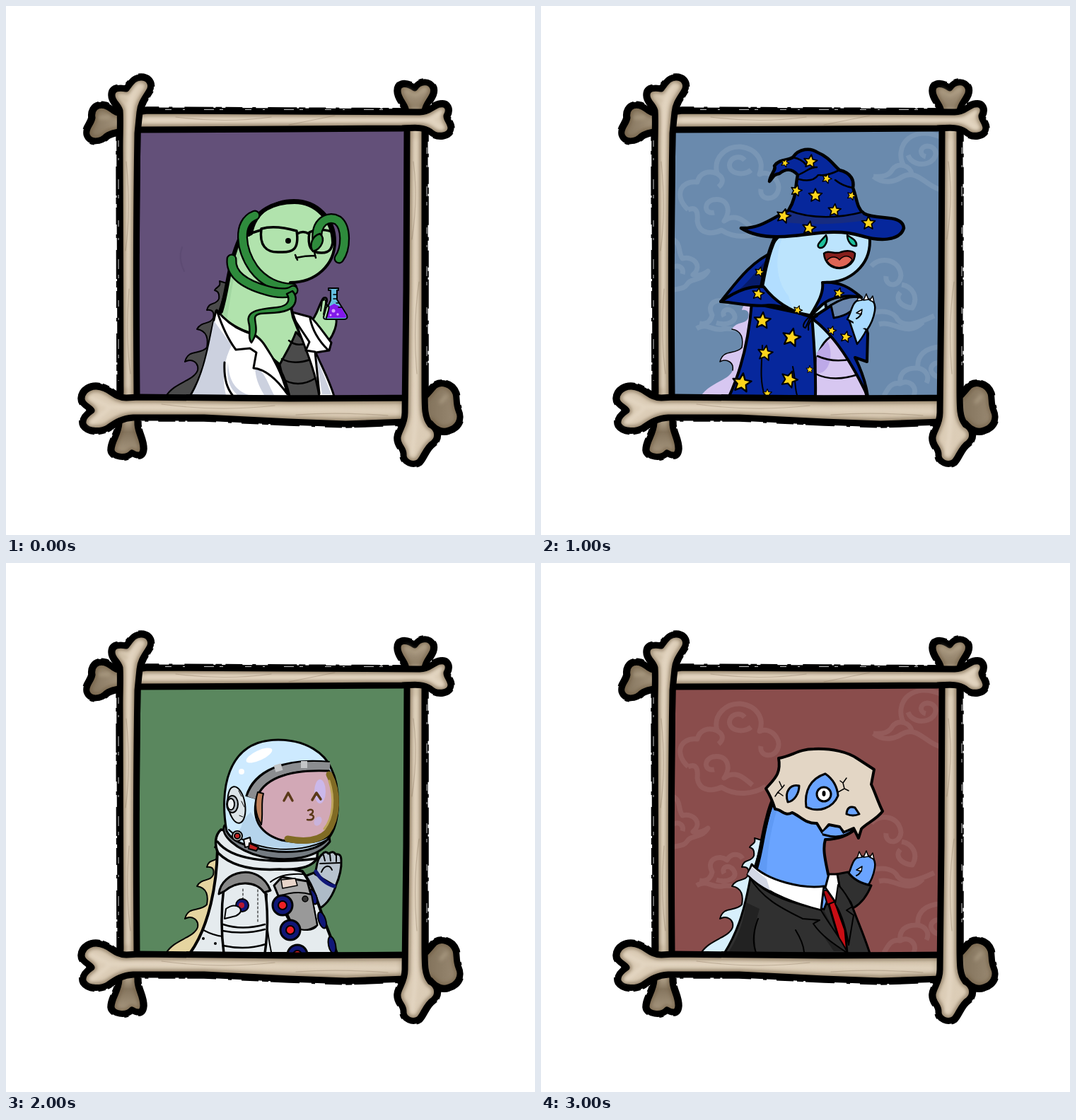
Animation of 748x748 px, one loop 4000 ms. Source, as an HTML page:

```html
<!DOCTYPE html>
<html lang="en">
<head>
<meta charset="utf-8">
<title>Bone frame portraits</title>
<style>
html, body { margin: 0; width: 100%; height: 100%; overflow: hidden; background: #fff }
svg { display: block; width: 100vw; height: 100vh }
.scene { visibility: hidden }
.scene.on { visibility: visible }
</style>
</head>
<body>
<svg viewBox="0 0 748 748" fill="none" stroke="#000" stroke-width="3" stroke-linejoin="round" stroke-linecap="round">
<defs>
  <clipPath id="inside"><path d="M185 175H567V554H185Z"/></clipPath>
  <clipPath id="upper"><path d="M100 80H300V350H100Z"/></clipPath>
  <clipPath id="headClip"><use href="#head"/></clipPath>
  <filter id="blur" filterUnits="userSpaceOnUse" x="80" y="80" width="590" height="590"><feGaussianBlur stdDeviation="2.5"/></filter>
  <linearGradient id="topFill" gradientUnits="userSpaceOnUse" x1="118" x2="632" y1="0" y2="0">
    <stop stop-color="#84745d"/><stop offset=".08" stop-color="#a3937b"/><stop offset=".13" stop-color="#dccdb7"/><stop offset="1" stop-color="#dccdb7"/>
  </linearGradient>
  <linearGradient id="rightFill" gradientUnits="userSpaceOnUse" x1="0" x2="0" y1="108" y2="645">
    <stop stop-color="#b3a28a"/><stop offset=".06" stop-color="#93836b"/><stop offset=".12" stop-color="#d6c7b0"/><stop offset="1" stop-color="#dccdb7"/>
  </linearGradient>
  <linearGradient id="bottomFill" gradientUnits="userSpaceOnUse" x1="108" x2="642" y1="0" y2="0">
    <stop stop-color="#dccdb7"/><stop offset=".83" stop-color="#d6c7b0"/><stop offset=".92" stop-color="#85755e"/><stop offset="1" stop-color="#9b8b74"/>
  </linearGradient>
  <linearGradient id="leftFill" gradientUnits="userSpaceOnUse" x1="0" x2="0" y1="103" y2="640">
    <stop stop-color="#dccdb7"/><stop offset=".88" stop-color="#d3c4ac"/><stop offset=".93" stop-color="#85755e"/><stop offset="1" stop-color="#b0a088"/>
  </linearGradient>

  <path id="left" d="M162 545L161 200C161 180 162 160 161 148C158 138 150 136 150 126C150 116 160 115 170 117C176 110 180 101 191 101C203 101 208 112 202 121C196 131 190 138 189 150L186 180C184 300 184 420 185 548L186 592C187 605 194 612 194 626C193 638 185 636 178 632C170 641 150 638 149 628C149 615 159 606 160 590Z"/>
  <path id="bottom" d="M170 554C156 554 150 545 140 541C125 534 108 540 107 555C107 565 119 567 121 572C112 578 106 585 110 593C117 603 135 602 145 596C156 588 165 583 180 582L280 582L400 588L480 591L565 588L600 590C608 600 618 603 626 600C638 597 646 585 640 572C636 562 638 555 636 548C631 534 615 530 606 537C600 543 598 548 590 554L400 555L188 553Z"/>
  <path id="right" d="M567 175L566 150C566 140 554 132 554 120C554 107 568 109 578 116C585 105 600 105 604 116C607 128 594 135 592 148L592 300L592 540C592 570 592 582 600 592C612 598 612 612 604 618C594 624 590 640 584 645C575 651 562 645 562 635C563 625 553 622 554 610C555 600 564 592 564 575L566 400Z"/>
  <path id="top" d="M170 152C150 153 150 143 140 141C128 138 120 146 122 158C120 168 112 172 114 182C118 195 135 192 142 184C150 178 155 180 165 176L190 175L400 174L560 173C580 172 590 171 600 178C610 187 628 184 629 173C629 165 622 160 623 155C628 146 624 137 614 139C604 140 600 150 585 150L400 149L200 148Z"/>

  <path id="head" d="M299 440C309 414 314 390 320 362C324 345 333 326 347 322C352 292 378 275 407 275C440 275 465 300 465 333C465 366 438 391 402 391C398 405 402 420 406 440L418 470L388 508L340 468Z"/>
  <path id="neckLine" d="M304 432C312 405 313 385 320 360C323 347 327 337 331 328" stroke-width="6"/>
  <path id="spikes" d="M226 552C238 532 266 530 271 515C273 504 263 498 253 503C258 484 274 494 284 483C286 472 285 459 270 457C277 445 289 451 293 441C295 433 292 429 284 430C287 417 297 424 301 414C302 407 300 403 295 402C298 396 304 398 302 389L312 392L304 470L278 552Z"/>
  <path id="star" d="M0-10L2.8-3.6L9.5-3.1L4.5 1.4L5.9 8.1L0 4.8L-5.9 8.1L-4.5 1.4L-9.5-3.1L-2.8-3.6Z"/>
  <g id="clouds" stroke="#fff" stroke-opacity=".1" stroke-width="7" stroke-linecap="butt">
    <path d="M208 288C188 270 196 246 221 249C224 236 236 232 249 237C243 214 262 198 282 199C306 202 316 220 309 238C324 231 340 248 335 262C330 277 308 274 311 259M249 237C259 243 258 250 251 256M297 232C285 242 263 236 267 222C270 213 282 211 288 218M208 288C221 283 222 293 221 304C224 325 245 322 255 317C275 330 300 327 318 316M245 292C231 295 229 278 243 274C263 270 270 288 259 304C276 291 289 306 299 314"/>
    <path d="M567 186C545 176 529 180 520 187C506 198 507 216 513 226M470 241C484 242 492 240 497 231C506 220 522 226 524 237M470 241C485 253 501 248 510 242C532 229 545 256 566 260M544 213C535 211 535 199 546 198C563 199 561 217 547 222C536 226 523 222 519 211"/>
    <path d="M186 330C199 336 193 348 200 357C216 353 229 368 215 380C223 382 229 380 236 375C227 390 212 384 207 393C202 401 194 399 186 402M187 369C197 365 202 372 200 379"/>
    <path d="M220 456C236 447 241 460 256 457C268 454 275 461 288 452M224 449C234 451 240 446 242 437C233 420 250 411 263 420C269 409 281 411 285 418M259 439C254 430 266 425 272 434C280 445 264 453 248 448"/>
    <path d="M467 368C480 353 507 358 509 381C507 399 486 397 488 382M510 394C526 397 534 412 525 427C508 425 500 414 508 405M468 434C486 429 500 434 504 443C514 456 535 448 556 438M478 450C500 444 517 470 540 447"/>
    <path d="M567 482C543 482 531 495 533 512C516 511 506 519 508 534C496 531 491 540 485 551M567 505C553 502 547 514 555 521C562 527 567 523 567 520M533 512C544 514 550 523 545 533M508 534C520 527 533 538 527 551"/>
  </g>
  <g id="hand">
    <path d="M433 443C439 433 440 418 449 416C453 414 455 415 457 415C461 413 464 414 466 416C472 417 473 425 472 431C470 443 466 451 461 458Z" stroke-width="2.5"/>
    <path d="M446 442Q451 440 453 434" stroke-width="2"/>
    <path fill="#fff" stroke-width="1.5" d="M447 417L450 408L454 416ZM456 416L460 407L463 415ZM465 416L469 410L471 419ZM446 434L454 429L453 436Z"/>
  </g>
</defs>

<!-- rough brush rim -->
<g stroke-width="11.500" stroke-dasharray="24 5 9 3 41 17 5 14" stroke-linecap="butt">
  <use href="#left"/><use href="#bottom"/><use href="#right"/><use href="#top"/>
</g>

<g clip-path="url(#inside)">
<g class="scene">
  <path fill="#635079" stroke="none" d="M185 175H567V554H185Z"/>
  <path d="M249 341Q243 357 252 375" stroke="#5d4b73" stroke-width="2"/>
  <use href="#spikes" fill="#4b4b4b" stroke-width="2"/>
  <path fill="#b1e3ad" d="M430 447C440 440 443 419 449 413C454 411 455 416 452 421L466 438C470 449 463 465 456 474Z"/>
  <use href="#head" fill="#b1e3ad" stroke-width="4"/>
  <path clip-path="url(#headClip)" fill="#a2d7a1" stroke="none" d="M298 440C312 410 316 360 335 323L340 330C323 365 319 405 312 445Z"/>
  <use href="#neckLine"/>
  <path d="M343 323C350 287 382 277 408 277C439 277 462 303 463 333" stroke-width="6"/>
  <path fill="#4b4b4b" d="M387 507C396 490 404 478 410 461L430 482L446 552H397Z"/>
  <path d="M390 499Q407 508 430 500M388 526Q413 542 438 526M400 473Q410 482 424 477" stroke-width="2.5"/>
  <path fill="#fff" d="M297 431C285 480 283 515 260 552H401C396 530 390 514 375 495C365 476 354 463 342 461C323 454 311 445 297 431Z"/>
  <path fill="#ccd1df" stroke="none" d="M294 445C286 485 281 516 263 550H311C306 530 306 505 319 480ZM314 504C315 530 324 543 343 550L327 550C315 539 311 524 314 504ZM352 511C365 515 370 533 379 550H365C356 535 353 525 352 511Z"/>
  <path fill="#fff" d="M298 430C305 452 313 470 325 486L345 484L354 490L350 512C370 514 386 532 398 549C392 526 381 502 368 483C356 462 343 464 335 459Q315 451 298 430Z"/>
  <path d="M309 504C308 523 312 540 320 550"/>
  <path fill="#fff" d="M405 433L431 440C441 449 451 465 460 476L457 487L438 490C445 507 457 528 464 552H443C438 520 426 490 415 462Z"/>
  <path fill="#ccd1df" stroke="none" d="M438 493L460 549H447Z"/>
  <path d="M409 445L429 475L424 487L437 489L443 548M430 442C433 457 442 473 455 486"/>
  <g stroke-width="2">
    <path fill="#64bfdf" d="M456 399H470V402H468V415L482 437Q484 443 478 443H453Q447 443 450 437L459 416V402H456Z"/>
    <path fill="#8219eb" stroke="none" d="M455 426L464 421L474 426L481 438Q482 441 478 441H453Q449 441 451 437Z"/>
    <path d="M463 408H468M463 414H468M467 420H471M470 426H475" stroke-width="1.5"/>
    <g fill="#d9a5ff" stroke="none"><circle cx="463" cy="431" r="2.5"/><circle cx="469" cy="436" r="1.7"/><circle cx="459" cy="437" r="1.5"/></g>
  </g>
  <path fill="#b1e3ad" d="M445 431L447 417Q453 412 452 421L449 436M449 440L453 426Q458 421 456 430L453 441" stroke-width="2"/>
  <g stroke-width="3.5"><path d="M344 322L360 317M361 315C377 310 397 314 411 318C415 345 405 349 387 348C367 349 358 338 361 315ZM412 322Q420 317 428 322M429 320C440 315 454 316 463 320C463 344 458 349 446 349C431 349 426 340 429 320Z"/></g>
  <circle cx="399" cy="332" r="4" fill="#000" stroke="none"/>
  <path d="M410 356Q423 353 437 353M409 352L412 359M436 348L438 356" stroke-width="2.5"/>
  <g id="snake"></g>
  <path fill="#2e8b3c" stroke-width="2.5" d="M405 403C413 411 411 425 398 430C379 438 353 430 352 441C352 451 358 460 347 476C341 469 347 459 343 447C339 429 365 428 384 426C400 424 402 415 397 407Z"/>
  <path fill="#2e8b3c" stroke-width="2.5" d="M434 347C428 338 433 325 444 322C452 329 447 343 434 347Z"/>
</g>

<g class="scene">
  <path fill="#6a8aad" stroke="none" d="M185 175H567V554H185Z"/>
  <use href="#clouds"/>
  <use href="#spikes" fill="#d7c7f1" stroke="none"/>
  <path d="M271 515C273 504 263 498 253 503C258 484 274 494 284 483C286 472 285 459 270 457" stroke-width="1.5"/>
  <path fill="#06279c" d="M254 418C272 397 293 363 330 347L319 402Z" stroke-width="4"/>
  <path fill="#061b6b" stroke="none" d="M279 402C296 388 311 366 323 354L316 397Z"/>
  <use href="#head" fill="#bce4fd" stroke-width="4"/>
  <path clip-path="url(#headClip)" fill="#b2deff" stroke="none" d="M295 450L335 318H345C330 350 330 386 350 410L385 520Z"/>
  <use href="#neckLine"/>
  <path fill="#d7c7f1" d="M389 503C394 480 403 471 412 466C440 480 452 510 460 552H386Z"/>
  <path fill="#bda9e8" stroke="none" d="M389 520C410 520 414 490 405 474L390 490Z"/>
  <path d="M391 495Q413 505 440 499M388 520Q414 533 451 520" stroke-width="2.5"/>
  <path fill="#06279c" stroke-width="4" d="M385 440L411 423C425 416 438 411 447 413L462 463L461 503L444 497C453 515 459 531 462 552C447 520 421 471 386 444Z"/>
  <path fill="#6a87ae" d="M410 423Q434 408 453 412C447 427 434 438 414 441Z"/>
  <g fill="#a9dbff"><path d="M435 442L464 448Q459 464 447 478Z" stroke-width="2.5"/><use href="#hand"/><path stroke="none" d="M441 440L461 440L460 455L443 458Z"/><path d="M446 442Q451 440 453 434" stroke-width="2"/></g>
  <path fill="#06279c" d="M298 420C294 470 284 513 266 552H388C389 512 386 474 383 438Z" stroke-width="4"/>
  <path fill="#06279c" d="M254 418C282 399 298 396 315 397C327 413 346 430 380 439C351 430 336 422 322 423C302 426 280 420 254 418ZM398 391C422 389 437 398 453 412C433 408 411 411 398 422L380 439C392 419 400 406 398 391Z" stroke-width="4"/>
  <path d="M313 480C312 507 309 529 316 550M356 510C360 528 359 542 362 550M379 440C370 448 369 455 374 455L381 440L397 452M382 439C390 430 397 440 384 441C375 455 379 452 378 458" stroke-width="2"/>
  <path fill="#06279c" stroke-width="4.500" d="M283 314C311 315 328 299 350 289C362 270 359 256 363 239C354 229 346 230 337 237C328 238 328 243 323 248C325 236 333 232 330 226C337 216 348 219 356 214C365 201 381 200 391 207C406 213 413 224 422 232C439 236 443 247 441 257C447 272 446 285 456 293C475 304 511 293 513 314C507 334 476 332 453 325C417 314 384 323 356 325C330 328 302 326 283 314Z"/>
  <path fill="#172c80" stroke="none" d="M352 291Q401 307 454 293L460 303Q400 312 345 306Z"/>
  <path d="M350 289C383 302 423 300 456 291M363 239C375 235 380 227 390 228M365 245Q384 250 392 239M356 214Q369 216 376 226M422 232Q403 241 394 239M441 257Q427 255 416 246" stroke-width="2.5"/>
  <g fill="#ffd51c" stroke-width="1.8" id="stars"></g>
  <g stroke-width="2.5">
    <path fill="#1dbf9b" d="M403 324C407 332 401 343 394 342C388 339 394 334 403 324ZM433 324C433 332 439 341 446 339C447 332 441 329 433 324Z"/>
    <path fill="#861f1c" d="M400 350C406 344 416 352 424 348C432 345 441 346 444 350C444 362 435 370 423 371C409 371 401 362 400 350Z"/>
    <path fill="#df6555" stroke-width="1.5" d="M404 360C410 353 418 354 422 359C429 351 437 353 440 359C431 373 413 373 404 360Z"/>
  </g>
</g>

<g class="scene">
  <path fill="#5a875e" stroke="none" d="M185 175H567V554H185Z"/>
  <use href="#spikes" fill="#e5d5a0" stroke-width="2"/>
  <path fill="#aebbc8" d="M415 446L438 437L466 458C460 474 452 485 440 490Z"/>
  <path fill="#b8c3ce" d="M437 440C440 427 440 417 447 412Q452 406 456 411Q463 406 466 412Q474 410 474 420C475 435 470 448 466 457Z"/>
  <path d="M449 413L451 421M458 412L459 421M467 413L467 422M444 425L472 424M446 437C450 427 458 426 461 434" stroke-width="2"/>
  <path d="M438 436Q447 452 464 457" stroke="#101777" stroke-width="5"/>
  <path fill="#e5ebee" d="M299 405C298 453 288 513 260 552H468L451 508C440 480 436 458 419 436Z" stroke-width="4"/>
  <path d="M279 519Q294 527 307 528M369 468C366 500 370 526 375 550M374 451Q390 438 421 440" stroke-width="2"/>
  <g fill="#000" stroke="none"><circle cx="279" cy="531" r="2"/><circle cx="296" cy="538" r="2"/></g>
  <g fill="#101777" stroke-width="2"><ellipse cx="434" cy="472" rx="5" ry="11" transform="rotate(-22 434 472)"/><ellipse cx="447" cy="505" rx="5" ry="12" transform="rotate(-18 447 505)"/><ellipse cx="461" cy="540" rx="5" ry="12" transform="rotate(-12 461 540)"/></g>
  <path fill="#aaa" d="M379 456L390 444L426 450L431 468L440 512Q432 524 407 514Q394 499 386 473Z"/>
  <path fill="#999" d="M386 471Q412 462 432 469L440 512Q420 526 405 511Z" stroke-width="2"/>
  <path fill="#e8d5ca" stroke-width="1.5" d="M389 448L409 446L412 456L391 460Z"/>
  <circle cx="423" cy="475" r="4" fill="#333" stroke-width="1.5"/>
  <g id="dials"></g>
  <path fill="#e5ebee" d="M308 459C304 490 304 521 308 552H366C371 517 371 487 365 456Q335 441 308 459Z" stroke-width="3.5"/>
  <path fill="#888" d="M301 468C304 435 358 422 374 463L365 466C353 449 326 449 309 464Z"/>
  <path d="M307 511Q334 520 366 511M306 520Q337 526 366 518M307 541Q339 548 367 539" stroke-width="2.5"/>
  <path d="M335 461V478M356 462V509" stroke-width="1" stroke-dasharray="3 3"/>
  <circle cx="334" cy="484" r="9" fill="#101777" stroke-width="2"/><circle cx="333" cy="484" r="4" fill="#b81930" stroke="none"/>
  <path fill="#e5ebee" d="M309 503L311 489Q322 481 330 487Q336 493 325 499Z" stroke-width="2"/>
  <path fill="#e5ebee" d="M304 377C296 384 294 398 300 410C321 431 354 435 387 433C410 434 433 431 440 417L441 402Z" stroke-width="3.5"/>
  <path d="M299 394C318 419 369 426 439 418" stroke-width="3.5"/>
  <path fill="#747b81" d="M309 371C302 384 325 406 361 415C400 424 440 417 458 394L457 387L320 377Z"/>
  <path fill="#cdeaff" d="M312 379C302 325 310 250 385 250C425 250 452 270 460 291C474 320 472 369 457 388C440 411 390 413 350 402C329 397 317 389 312 379Z"/>
  <path fill="#b5d4ec" stroke="none" d="M314 378C340 402 414 413 453 390L455 380C410 406 364 390 346 352L334 365Q334 384 314 378Z"/>
  <path d="M315 377C344 406 411 415 455 391" stroke-width="2"/>
  <path d="M346 332C355 300 393 282 457 288" stroke-width="16" stroke-linecap="butt"/>
  <path d="M347 332C358 301 394 282 458 288" stroke="#8b8d90" stroke-width="12" stroke-linecap="butt"/>
  <path d="M380 291L390 288M417 285L426 285" stroke="#c3c5c7" stroke-width="10" stroke-linecap="butt"/>
  <path fill="#d2a8b6" d="M354 334C362 307 396 291 457 294C472 320 474 365 456 386C440 398 410 396 390 392C362 384 347 365 354 334Z"/>
  <path d="M457 299C471 325 469 361 454 381C441 394 418 394 398 390" stroke="#806b24" stroke-width="9"/>
  <path d="M457 308C465 333 463 360 450 376" stroke="#bda55a" stroke-width="3"/>
  <path fill="#be805b" stroke-width="2" d="M356 324C351 340 352 355 361 370C364 353 360 340 364 326Z"/>
  <g stroke="none"><ellipse cx="444" cy="323" rx="8" ry="17" fill="#cbb8ea"/><ellipse cx="441" cy="365" rx="5" ry="7" fill="#c9b3dc" transform="rotate(30 441 365)"/><ellipse cx="358" cy="272" rx="20" ry="7" fill="#fff" transform="rotate(-25 358 272)"/><circle cx="333" cy="295" r="4" fill="#fff"/></g>
  <path d="M393 336L399 325L405 336M433 335L439 325L445 334" stroke="#5a3918" stroke-width="3.5"/>
  <path d="M427 350C434 346 437 353 430 356C438 356 436 365 426 363" stroke="#5a3918" stroke-width="2.5"/>
  <g stroke-width="2"><ellipse cx="326" cy="342" rx="12" ry="26" fill="#dce4e8" transform="rotate(-9 326 342)"/><ellipse cx="320" cy="341" rx="8" ry="12" fill="#b6bec4"/><ellipse cx="318" cy="341" rx="5" ry="8" fill="#eef2f4"/>
    <path d="M329 322L333 330M333 337L337 345M330 357L335 359" stroke-width="1"/>
    <circle cx="327" cy="386" r="7" fill="#eee"/><circle cx="327" cy="386" r="4" fill="#bd2222"/>
    <path fill="#eee" d="M336 391L345 388L347 400L338 402Z"/><path fill="#bd2222" d="M344 396L357 402L354 407L343 404Z"/></g>
</g>

<g class="scene">
  <path fill="#8a4d4c" stroke="none" d="M185 175H567V554H185Z"/>
  <use href="#clouds" opacity=".8"/>
  <use href="#spikes" fill="#d7effc" stroke-width="2"/>
  <g fill="#6aa4ff"><use href="#hand"/></g>
  <path fill="#303030" d="M408 442L434 437Q445 452 467 456Q458 478 443 487L424 490Z"/>
  <use href="#head" fill="#6aa4ff" stroke-width="4"/>
  <path clip-path="url(#headClip)" fill="#5f9af5" stroke="none" d="M300 442L335 320L340 330Q318 390 319 450Z"/>
  <use href="#neckLine"/>
  <path fill="#303030" d="M297 440C289 485 280 519 259 552H465C456 524 447 505 438 480L416 449L400 490Z"/>
  <path fill="#222" stroke="none" d="M290 480Q285 520 266 549H304Q300 515 309 489ZM400 491L430 549H414L386 508Z"/>
  <path fill="#c90d14" d="M401 466L411 463L415 477L430 519L433 552L424 541L407 483Z"/>
  <path fill="#b40a10" d="M399 463L411 463L415 479L405 483Z" stroke-width="2"/>
  <path fill="#fff" d="M298 426C320 450 371 461 400 457L396 491C365 483 323 470 292 441ZM407 440L419 440L425 474L418 482L402 459Z"/>
  <path fill="#d3d8e6" stroke="none" d="M298 430L292 440Q306 454 324 463L319 447Z"/>
  <path fill="#303030" d="M294 443C321 473 359 482 396 491C408 512 423 529 434 552C416 540 397 528 385 510L394 505L370 503C340 488 314 476 294 443ZM420 455C428 463 434 472 440 486L432 491L442 498L435 540Q429 502 416 482Z" stroke-width="2"/>
  <path d="M307 503C299 523 300 540 304 551M360 519Q371 537 372 550" stroke-width="2"/>
  <path fill="#e3d6c5" stroke-width="4" d="M336 276C355 273 364 263 386 263C411 262 434 267 448 277L471 292L467 313C473 326 477 339 483 351C474 363 460 368 453 376L449 389L442 375L428 381L422 373L407 370L398 381L390 368C374 369 366 357 355 353C344 359 340 348 331 348C327 335 323 327 318 319C329 306 340 299 336 276Z"/>
  <path fill="#6aa4ff" stroke="none" d="M398 381L407 373L422 375L427 383L442 377Q432 391 400 386Z"/>
  <path d="M399 384Q425 392 441 378" stroke-width="3"/>
  <g fill="#6aa4ff"><path d="M375 345C372 322 381 305 402 298C415 307 419 318 420 329C413 346 393 354 375 345ZM349 338C344 324 352 312 365 315C365 326 358 337 349 338ZM432 355Q433 342 444 346L450 355Q441 359 432 355Z"/></g>
  <circle cx="400" cy="327" r="10" fill="#fff"/><ellipse cx="400" cy="326" rx="2.5" ry="4" fill="#000" stroke="none"/>
  <path d="M337 309L341 318L335 324L342 329M341 318L344 314M335 324L331 330M432 304L427 311L429 319L420 324M427 311L423 308M429 319L435 322" stroke-width="1.5"/>
</g>
</g>

<g id="frame"></g>
<g filter="url(#blur)" stroke-width="5" stroke="#eee2cf" stroke-opacity=".5">
  <path d="M188 110Q173 128 174 160L172 538M200 161H600L616 149M602 163L617 174M579 190V575Q579 600 574 633M120 554L147 567Q300 568 410 571L555 573M119 591L144 571"/>
  <path d="M159 127L169 134M133 158L145 157M567 118L579 126L593 116M622 552L615 560" stroke="#bdae94"/>
</g>
<g stroke="#705f48" stroke-opacity=".3" stroke-width="1.2">
  <path d="M170 220Q177 290 169 346M174 400Q169 470 176 520M240 157Q310 166 375 157M400 168Q430 162 465 155M576 220Q583 270 574 330M584 390Q575 450 581 520M220 563Q300 574 380 565M410 578Q470 574 540 579"/>
</g>
<!-- chips in the ink -->
<path d="M159 190V530M225 146.500H545M595 200V520" stroke="#fff" stroke-width=".8" stroke-dasharray="9 16 3 27 14 8 5 31" stroke-linecap="butt"/>
</svg>
<script>
const $ = id => document.getElementById(id);

// fill, soft inner edge shade, ink outline
const bone = id => `<clipPath id="${id}Clip"><use href="#${id}"/></clipPath>
  <g clip-path="url(#${id}Clip)"><use href="#${id}" fill="url(#${id}Fill)"/>
  <use href="#${id}" stroke="#6f5b42" stroke-width="15" stroke-opacity=".6" filter="url(#blur)"/></g>
  <use href="#${id}" stroke-width="9"/>`;
$('frame').innerHTML = ['left', 'bottom', 'right', 'top'].map(bone).join('') +
  `<g clip-path="url(#upper)">${bone('left')}</g>`;

const coils = [
  'M352 296C326 306 332 345 350 371C364 390 385 399 405 399',
  'M319 358C317 382 343 395 368 402C384 407 400 407 406 402',
  'M440 333C437 304 456 296 469 303C482 313 481 343 471 357'
];
$('snake').innerHTML = coils.map(d =>
  `<path d="${d}" stroke-width="15"/><path d="${d}" stroke="#2e8b3c" stroke-width="10.500"/>`).join('');

const stars = [
  [381, 220, .9, 8], [345, 222, .55, 20], [404, 244, .65, 20], [361, 261, .75, 15], [388, 268, .9, 0],
  [439, 268, .6, 20], [343, 297, .95, 15], [415, 289, .85, 5], [463, 307, .9, 0], [379, 314, .9, 10],
  [309, 376, .65, 15], [307, 407, .8, 10], [421, 406, .7, 15], [363, 430, .6, 20],
  [313, 445, 1.1, 5], [354, 469, 1.2, 12], [317, 491, 1, 10], [284, 533, 1.25, 8], [351, 528, 1.1, 20],
  [380, 514, .5, 0], [411, 459, .6, 15], [431, 468, .75, 12], [320, 548, .6, 0]
];
$('stars').innerHTML = stars.map(([x, y, s, a]) =>
  `<use href="#star" transform="translate(${x} ${y}) rotate(${a}) scale(${s * 1.1})"/>`).join('');

$('dials').innerHTML = [[391, 484], [402, 519], [412, 554]].map(([x, y]) =>
  `<circle cx="${x}" cy="${y}" r="14" fill="#101777"/><circle cx="${x}" cy="${y}" r="6" fill="#ed2024" stroke-width="2"/>`).join('');

const scenes = document.querySelectorAll('.scene');
function draw() {
  const now = Math.floor(performance.now() / 1000) % scenes.length;
  scenes.forEach((s, i) => s.classList.toggle('on', i === now));
  requestAnimationFrame(draw);
}
draw();
</script>
</body>
</html>
```
